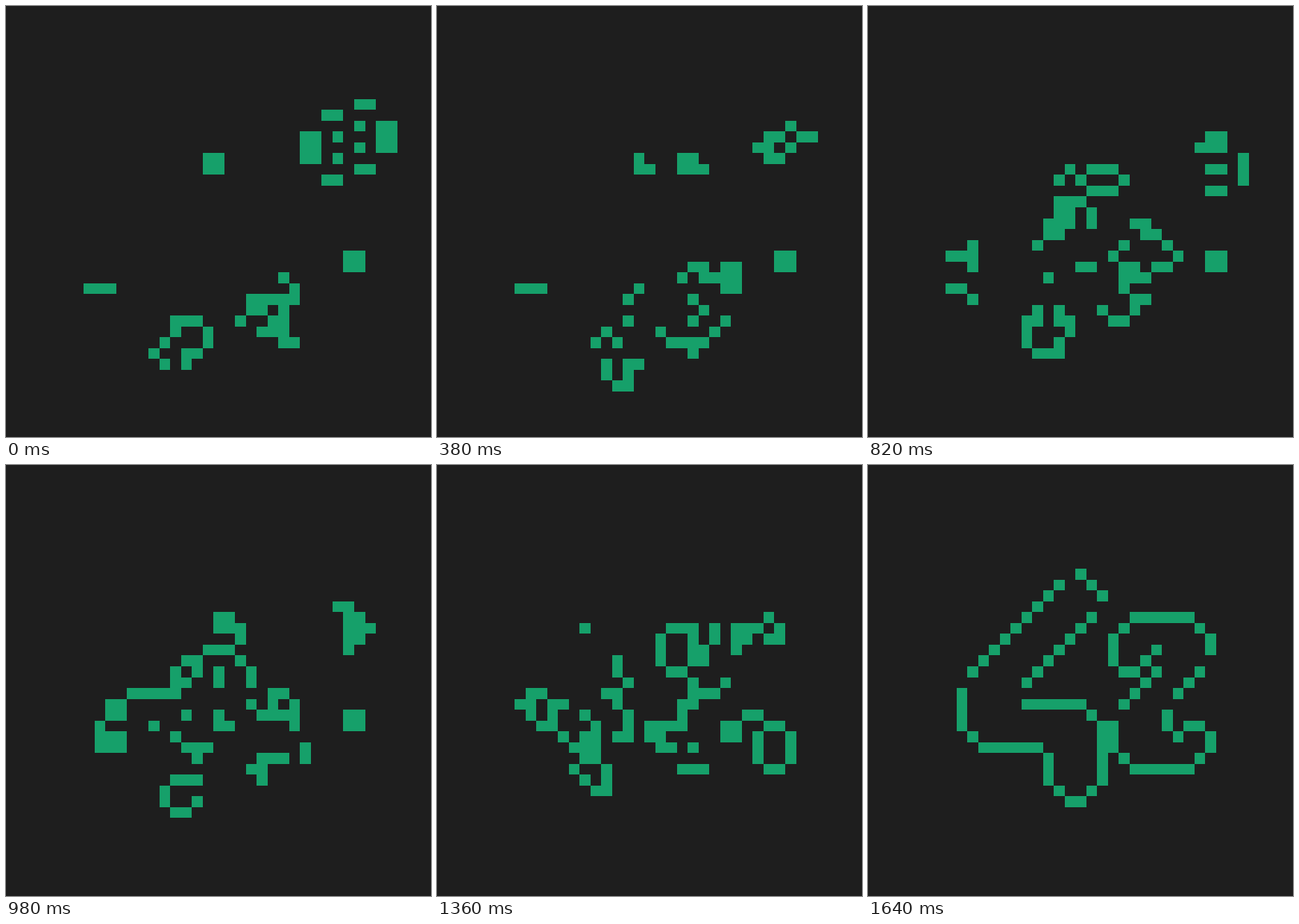
These frames come from a looping animation (570 px wide and 578 px high, 1680 ms). An HTML page with a canvas:

```html
<!DOCTYPE html>
<html lang="en">
<head>
<meta charset="utf-8">
<title>Life, rewound</title>
<style>
  html, body { margin: 0; width: 100%; height: 100%; overflow: hidden; background: #1e1e1e; }
  canvas { display: block; width: 570px; height: 578px; }
</style>
</head>
<body>
<canvas id="stage" width="570" height="578"></canvas>
<script>
const COLS = 29, ROWS = 27;             // walled board; everything outside stays dead
const W = COLS + 2, H = ROWS + 2;       // board plus its dead border
const CELL = 14.52, LEFT = 104, TOP = 124.8;
const LOOP = 1680, PACE = 60;           // ms per loop, ms per generation
const LAST = LOOP / PACE - 1;

// Key points of the digits' outlines
const four = [
  "10,2 2,10", "12,1 14,3", "13,5 7,11",
  "1,12 1,15 3,17 8,17 9,18 9,20 11,22 12,22 14,20 14,15 12,13 7,13"
];
const two = [
  "24,8 24,7 22,5 17,5 15,7 15,9 16,10 17,10 19,8", "19,10 16,13", "23,10 21,12",
  "15,15 15,17 17,19 22,19 24,17 24,16 23,15 22,15 21,16 20,15 20,14"
];

function trace(grid, stroke) {
  const points = stroke.split(" ").map(p => p.split(",").map(Number));
  points.slice(1).forEach(([x2, y2], i) => {
    const [x1, y1] = points[i];
    const n = Math.max(Math.abs(x2 - x1), Math.abs(y2 - y1));
    for (let k = 0; k <= n; k++) {
      const x = x1 + (x2 - x1) * k / n, y = y1 + (y2 - y1) * k / n;
      grid[(y + 1) * W + x + 1] = 1;
    }
  });
  return grid;
}

function evolve(grid) {
  const next = new Uint8Array(W * H);
  for (let y = 1; y <= ROWS; y++) {
    for (let x = 1; x <= COLS; x++) {
      const i = y * W + x;
      let n = -grid[i];
      for (let r = i - W; r <= i + W; r += W) n += grid[r - 1] + grid[r] + grid[r + 1];
      next[i] = n === 3 || (n === 2 && grid[i]) ? 1 : 0;
    }
  }
  return next;
}

const history = [[...four, ...two].reduce(trace, new Uint8Array(W * H))];
while (history.length <= LAST) history.push(evolve(history[history.length - 1]));

const ctx = document.getElementById("stage").getContext("2d");
const px = x => Math.round(LEFT + (x - 1) * CELL);
const py = y => Math.round(TOP + (y - 1) * CELL);

function paint(grid) {
  ctx.fillStyle = "#1e1e1e";
  ctx.fillRect(0, 0, 570, 578);
  ctx.fillStyle = "#16a06a";
  grid.forEach((on, i) => {
    if (!on) return;
    const x = i % W, y = (i - x) / W;
    ctx.fillRect(px(x), py(y), px(x + 1) - px(x), py(y + 1) - py(y));
  });
}

// Generations rewound at time t; the beat lags slightly mid-loop
function rewound(t) {
  const lead = 30 - 16 * Math.sin(Math.PI * t / LOOP);
  return Math.min(LAST, Math.floor((t + lead) / PACE));
}

const start = performance.now();
let shown = -1;

function frame(now) {
  const g = rewound(Math.max(0, now - start) % LOOP);
  if (g !== shown) {
    shown = g;
    paint(history[LAST - g]);
  }
  requestAnimationFrame(frame);
}
frame(start);
</script>
</body>
</html>
```
